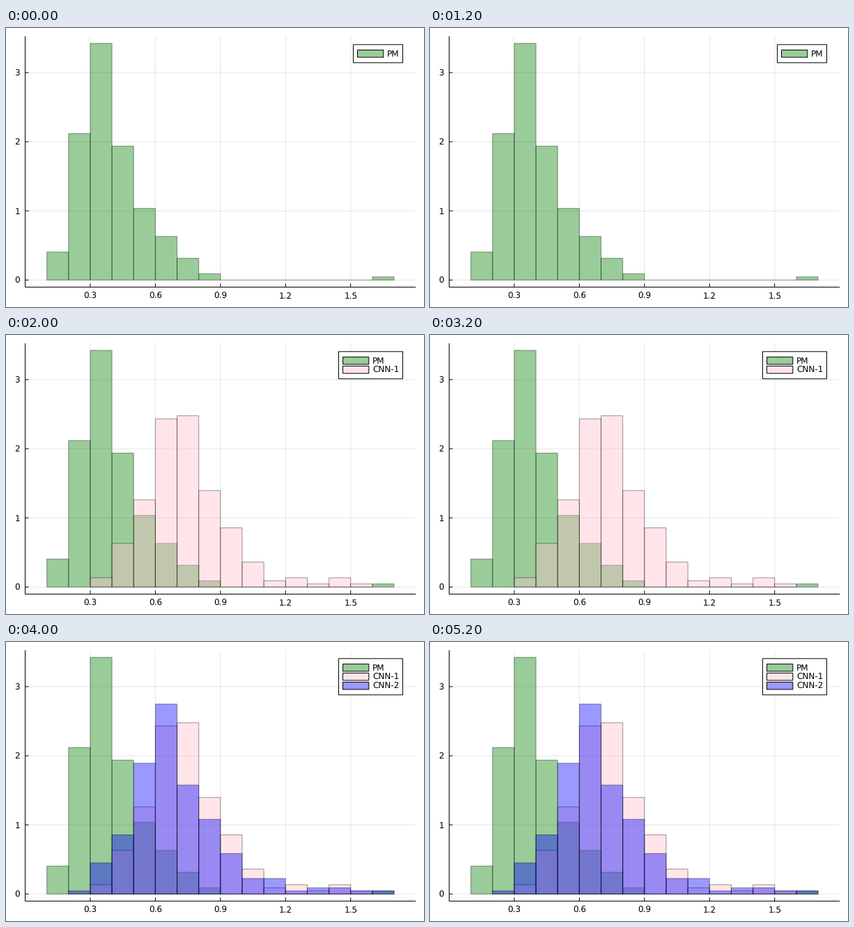
Animation of 600x400 px, one loop 6000 ms. Source, as a matplotlib script:

```python
import matplotlib.pyplot as plt
from matplotlib.animation import FuncAnimation
from matplotlib.patches import Rectangle

plt.rcParams["font.family"] = "DejaVu Sans"
plt.rcParams["text.hinting"] = "none"

W, H, DPI = 600, 400, 100
PX = 72 / DPI
LEFT, RIGHT, TOP, BOTTOM = 27.5, 588.19, 11.81, 371.5
BIN, TOTAL, ALPHA = 0.1, 222, 0.4

# name, colour, start of the first bin, counts
SERIES = [
    ("PM", "green", 0.1,
     [9, 47, 76, 43, 23, 14, 7, 2, 0, 0, 0, 0, 0, 0, 0, 1]),
    ("CNN-1", "pink", 0.3,
     [3, 14, 28, 54, 55, 31, 19, 8, 2, 3, 1, 3, 1]),
    ("CNN-2", "blue", 0.2,
     [1, 10, 19, 42, 61, 35, 24, 13, 5, 5, 1, 2, 2, 1, 1]),
]
Y_MAX = 76 / (TOTAL * BIN)
Y_LOW, Y_HIGH = -0.03 * Y_MAX, 1.03 * Y_MAX

fig = plt.figure(figsize=(W / DPI, H / DPI), dpi=DPI, facecolor="white")
ax = fig.add_axes([0, 0, 1, 1])


def px(x):
    return LEFT + x / 1.8 * (RIGHT - LEFT)


def py(y):
    return BOTTOM - (y - Y_LOW) / (Y_HIGH - Y_LOW) * (BOTTOM - TOP)


def line(x0, y0, x1, y1, alpha=1):
    ax.plot([x0, x1], [y0, y1], color="black", lw=PX, alpha=alpha,
            solid_capstyle="butt", snap=False, zorder=1)


def box(x, y, w, h, face, edge="black", zorder=2):
    ax.add_patch(Rectangle((x, y), w, h, facecolor=face, edgecolor=edge,
                           lw=PX, snap=False, zorder=zorder))


def label(x, y, text, ha):
    ax.text(x, y + 4.4, text, ha=ha, va="baseline", fontsize=12 * PX,
            color="black", zorder=5)


def draw_axes():
    xticks = [0.3, 0.6, 0.9, 1.2, 1.5]
    for x in xticks:
        line(px(x), TOP, px(x), BOTTOM, 0.1)
    for y in range(4):
        line(LEFT, py(y), RIGHT, py(y), 0.1)
    line(LEFT, BOTTOM, RIGHT, BOTTOM)
    line(LEFT, TOP, LEFT, BOTTOM)
    for x in xticks:
        line(px(x), BOTTOM, px(x), BOTTOM - 5)
        label(px(x), 383.6, f"{x}", "center")
    for y in range(4):
        line(LEFT, py(y), LEFT + 5, py(y))
        label(20, py(y), f"{y}", "right")


def draw_bars(color, start, counts):
    for i, n in enumerate(counts):
        x = start + i * BIN
        top = py(n / (TOTAL * BIN))
        box(px(x), top, px(x + BIN) - px(x), py(0) - top,
            (color, ALPHA), ("black", ALPHA))


def draw_legend(shown):
    left = 498.5 if len(shown) == 1 else 477.5
    top, row = 23.8, 13
    box(left, top, 569.5 - left, row * (len(shown) + 1), "white", zorder=3)
    for i, (name, color, *_) in enumerate(shown):
        y = top + row * (i + 1)
        box(left + 6, y - 5.2, 37.3, 10.4, (color, ALPHA), zorder=4)
        label(left + 48.5, y, name, "left")


def draw(frame):
    ax.clear()
    ax.set_xlim(0, W)
    ax.set_ylim(H, 0)
    ax.axis("off")
    draw_axes()
    shown = SERIES[:frame + 1]
    for _, color, start, counts in shown:
        draw_bars(color, start, counts)
    draw_legend(shown)
    return []


anim = FuncAnimation(fig, draw, frames=3, init_func=lambda: draw(0),
                     interval=2000, repeat=True, repeat_delay=0)
plt.show()
```
